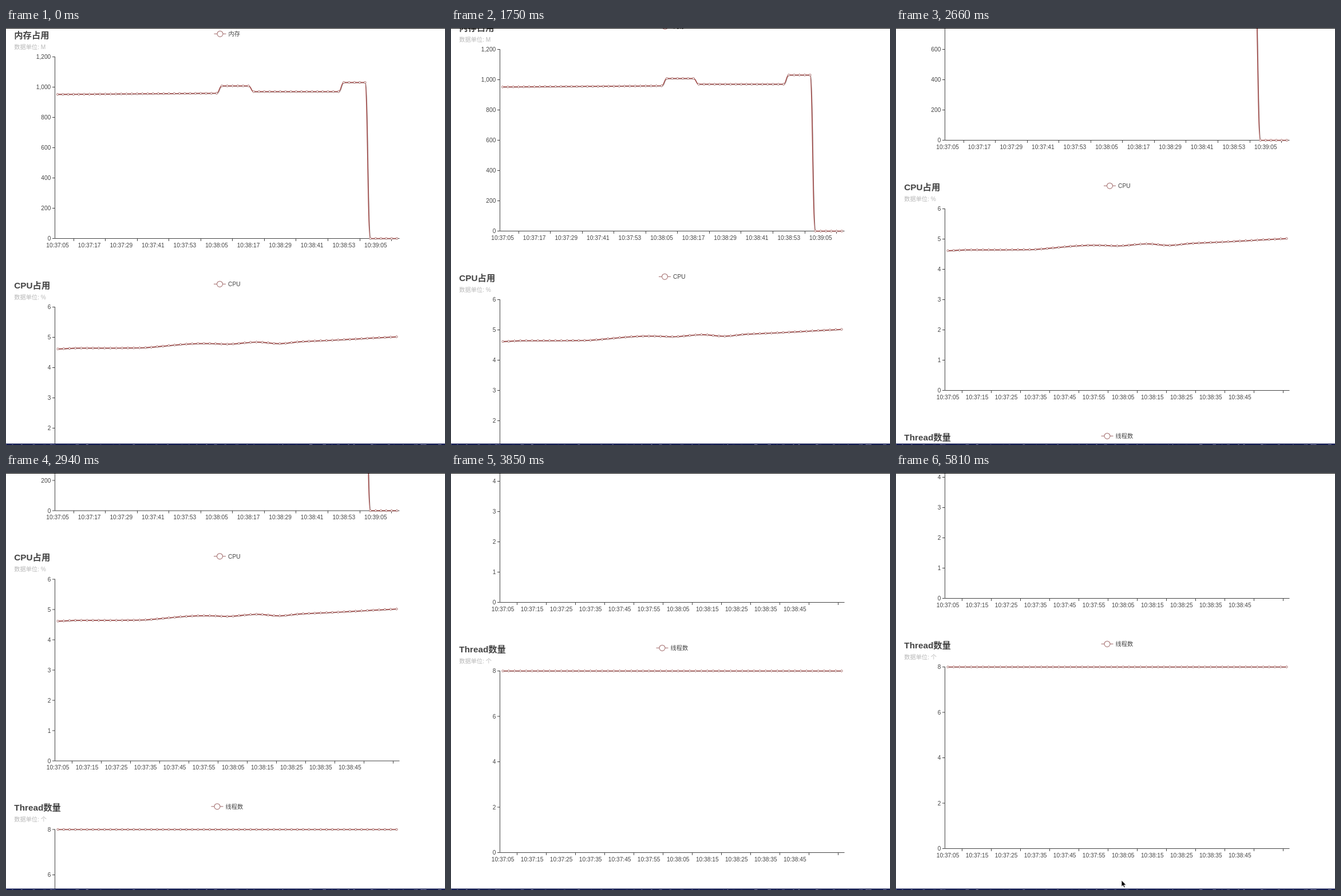
An HTML page for the animation above (5880 ms loop, 767 by 730 pixels).

```html
<!DOCTYPE html>
<html lang="zh-CN">
<head>
<meta charset="utf-8">
<title>性能监控</title>
<style>
  html, body { margin: 0; width: 100%; height: 100%; overflow: hidden; background: #fff; }
  svg { display: block; font: 10.2px "Liberation Sans", "Noto Sans CJK SC", "Noto Sans CJK", sans-serif; fill: #444; }
  .title { font-size: 15.3px; font-weight: bold; }
  .unit { fill: #b8b8b8; }
  .end { text-anchor: end; }
  .mid { text-anchor: middle; }
  .axis { fill: none; stroke: #444; }
  .shade { fill: none; stroke: #444; stroke-opacity: .5; }
  .line { fill: none; stroke: #a4504e; stroke-width: 1.7; }
  .dot { fill: #fff; stroke: #a0605e; stroke-width: .9; }
  .key { fill: #fff; stroke: #ad7d7d; stroke-width: 1.2; }
</style>
</head>
<body>
<svg width="767" height="730" viewBox="0 0 767 730">
  <g id="page"></g>
  <rect width="767" height="1" fill="#000"/>
  <rect y="727.5" width="767" height="2.5" fill="#141d52"/>
  <g id="specks" fill="#8d8cab"></g>
  <path id="cursor" d="M0 0V11.2L2.6 8.8L4.5 13L6.3 12.2L4.5 8.2H8Z"
    fill="#000" stroke="#fff" stroke-width=".8"/>
</svg>
<script>
const LOOP = 5880, STEP = 70;
const LEFT = 85.5, WIDTH = 602, TOP = 50.5, HEIGHT = 318, SPACING = 438;

const bump = (i, center, width) => Math.exp(-(((i - center) / width) ** 2));

function memory(i) {
  if (i < 31) return 952 + i * 0.25;
  if (i < 37) return 1008;
  if (i < 54) return 970;
  return i < 59 ? 1031 : 0;
}

// Flat start, then a steady rise with a few soft waves
function cpu(i) {
  return Math.max(4.645, 4.63 + (i - 13) * 0.00867)
    - 0.028 * bump(i, 0, 2) + 0.07 * bump(i, 23, 6) - 0.02 * bump(i, 29, 2)
    + 0.035 * bump(i, 34, 2.5) - 0.05 * bump(i, 38, 2.5) - 0.02 * bump(i, 46, 8);
}

const charts = [
  { title: '内存占用', unit: 'M', legend: '内存', keyX: 374, max: 1200, gap: 200,
    count: 65, every: 6, tickX: 118, value: memory },
  { title: 'CPU占用', unit: '%', legend: 'CPU', keyX: 373.5, max: 6, gap: 1,
    count: 59, every: 5, tickX: 115.5, value: cpu },
  { title: 'Thread数量', unit: '个', legend: '线程数', keyX: 369, max: 8, gap: 2,
    count: 59, every: 5, tickX: 115.5, value: () => 8 }
];

// Three swipes, then a small bounce
const swipes = [
  { start: 1680, time: 840, by: 152.4, drag: 3.65 },
  { start: 2590, time: 560, by: 183.3 },
  { start: 3220, time: 756, by: 251.3 },
  { start: 4340, time: 140, by: 3 },
  { start: 4550, time: 350, by: -3 }
];

function glide(t, { start, time, drag = 2.5 }) {
  const u = Math.min(Math.max((t - start) / time, 0), 1);
  return 1 - (1 - u ** 1.5) ** drag;
}

const text = (x, y, cls, s) => `<text x="${x}" y="${y}" class="${cls}">${s}</text>`;

function clock(seconds) {
  const total = 37 * 60 + 5 + seconds;
  const pad = n => String(n).padStart(2, '0');
  return `10:${pad(Math.floor(total / 60))}:${pad(total % 60)}`;
}

function drawChart(c, index) {
  const bottom = TOP + HEIGHT, cell = WIDTH / c.count;
  const px = i => LEFT + cell * (i + 0.5);
  const py = v => bottom - v / c.max * HEIGHT;

  let labels = '', axis = `M${LEFT} ${TOP - 0.5}V${bottom}H${LEFT + WIDTH}`;
  for (let v = 0; v <= c.max; v += c.gap) {
    axis += `M${LEFT - 4.5} ${py(v)}H${LEFT}`;
    labels += text(78.3, py(v) + 3.6, 'end', v.toLocaleString('en-US'));
  }
  for (let i = 0; i < c.count; i += c.every) {
    const x = Math.floor(c.tickX + i * cell) + 0.5;
    axis += `M${x} ${bottom}v4.5`;
    if (i < c.count - 4) labels += text(px(i), bottom + 15.2, 'mid', clock(i * 2));
  }

  let line = '', dots = '', prev;
  for (let i = 0; i < c.count; i++) {
    const x = px(i), y = py(c.value(i)), m = x - cell / 2;
    line += i ? `C${m} ${prev} ${m} ${y} ${x} ${y}` : `M${x} ${y}`;
    dots += `<circle class="dot" cx="${x}" cy="${y}" r="1.75"/>`;
    prev = y;
  }

  return `<g transform="translate(0 ${index * SPACING})">`
    + text(14.3, 17.6, 'title', c.title)
    + text(14.3, 36.8, 'unit', '数据单位: ' + c.unit)
    + `<path class="key" d="M${c.keyX - 10.5} 10.3h21"/>`
    + `<circle class="key" cx="${c.keyX}" cy="10.3" r="5"/>`
    + text(c.keyX + 14.6, 14, '', c.legend)
    + `<path class="axis" d="${axis}"/>` + labels
    + `<path class="shade" transform="translate(.8 .8)" d="${line}"/>`
    + `<path class="line" d="${line}"/>` + dots + '</g>';
}

function drawSpecks() {
  let seed = 7, out = '';
  const random = () => (seed = seed * 16807 % 2147483647) / 2147483647;
  for (let x = 0; x < 767; x += 4 + random() * 22) {
    out += `<rect x="${x}" y="729" width="${1 + random() * 5}" height="1" opacity="${random()}"/>`;
  }
  return out;
}

const find = id => document.getElementById(id);
const page = find('page'), cursor = find('cursor');
page.innerHTML = charts.map(drawChart).join('');
find('specks').innerHTML = drawSpecks();

const origin = performance.now();
function frame() {
  const now = (performance.now() - origin) % LOOP;
  const t = Math.floor(now / STEP) * STEP;

  const scroll = swipes.reduce((sum, s) => sum + s.by * glide(t, s), 0);
  page.setAttribute('transform', `translate(0 ${-Math.round(scroll * 2) / 2})`);

  const drop = glide(t, { start: 5250, time: 280 }), nudge = glide(t, { start: 5740, time: 70 });
  cursor.setAttribute('visibility', t >= 5040 ? 'visible' : 'hidden');
  cursor.setAttribute('transform', `translate(${440 - 42 * drop - 4 * nudge} ${515 + 171 * drop + 27 * nudge})`);
  requestAnimationFrame(frame);
}
frame();
</script>
</body>
</html>
```
